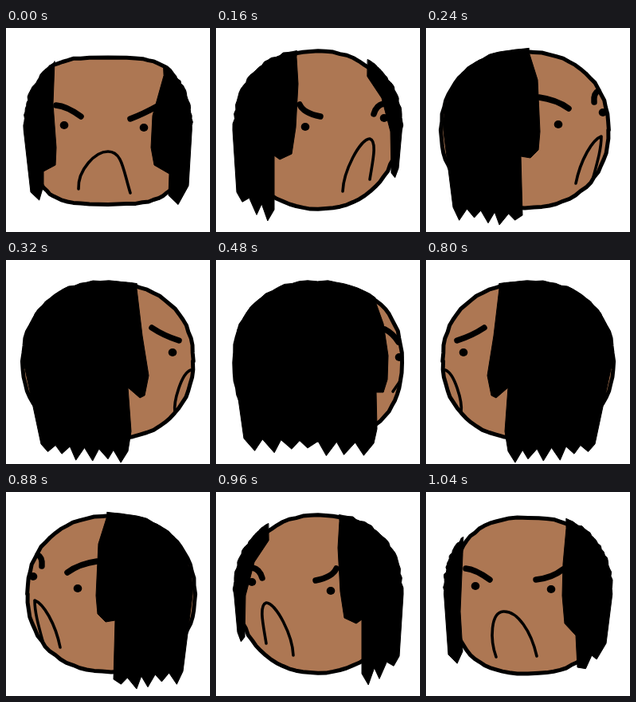
Animation, 256 px wide and 256 px high, one loop 1.12 s. Source, as an HTML page:

```html
<!DOCTYPE html>
<html lang="en">
<head>
<meta charset="utf-8">
<title>Turning head</title>
<style>
  html, body { margin: 0; width: 100%; height: 100%; overflow: hidden; background: #fff; }
  svg { display: block; width: 100%; height: 100%; }
  g { stroke: #000; stroke-linejoin: round; stroke-linecap: round; }
  .skin { fill: #ad7753; stroke-width: 5; }
  .hair { stroke-width: 1; }
  .line { fill: none; stroke-width: 3.6; }
  .brow { fill: none; stroke-width: 7.5; }
  .eye { stroke: none; }
</style>
</head>
<body>
<svg id="stage" viewBox="0 0 256 256"></svg>
<script>
const STEP = 80;
const MANE = { x: 128, y: 128, rx: 106, ry: 102, n: 2.3 };

// Poses from facing front to facing away, all turning right.
// skull: centre y, radii and squareness. near / far: the inner edge of the hair
// from top to bottom, its outer hem corner and how many tufts hang between.
// The far side is written mirrored.
const poses = [
  {
    skull: { y: 129, rx: 94, ry: 92, n: 3.5 },
    near: { edge: 'M61 42L59 95L63 150L62 172L47 180L47 198', hem: [31, 206], tufts: 1 },
    far: { edge: 'M58 60L72 110L74 150L70 172L51 183L52 210', hem: [27, 198], tufts: 1 },
    brows: 'M63 97Q76 98 94 111M156 114Q172 108 190 98',
    eyes: [[73, 122], [173, 125]],
    mouth: 'M91 202C90 178 112 155 128 155C146 155 147 178 156 207'
  },
  {
    skull: { y: 130, rx: 95, ry: 98, n: 2.5 },
    near: { edge: 'M80 46L84 90L85 130L82 165L68 180L66 220', hem: [30, 190], tufts: 2 },
    far: { edge: 'M46 78L43 150L46 200', hem: [28, 204], tufts: 1 },
    brows: 'M84 97Q98 108 118 110M206 96Q194 97 176 110',
    eyes: [[99, 122], [194, 118]],
    mouth: 'M168 207C176 185 175 151 159 150C141 149 124 175 117 206'
  },
  {
    skull: { y: 128, rx: 100, ry: 99, n: 2.1 },
    near: { edge: 'M101 37L103 70L100 125L95 158L80 165L73 160L73 228', hem: [26, 206], tufts: 3 },
    far: { edge: 'M66 61L48 88L37 130L36 182', hem: [27, 176], tufts: 1 },
    brows: 'M105 96Q110 107 131 111M198 108Q201 97 210 95',
    eyes: [[112, 124], [211, 113]],
    mouth: 'M159 205C160 180 180 140 193 139C203 142 196 170 193 190'
  },
  {
    skull: { x: 124, y: 128, rx: 105, ry: 98, n: 2.2 },
    near: { edge: 'M129 30L140 65L143 130L141 153L131 163L119 161L121 235', hem: [34, 225], tufts: 5 },
    brows: 'M179 101Q164 90 142 87M216 79Q210 82 211 93',
    eyes: [[166, 121], [222, 106]],
    mouth: 'M210 187C216 165 220 150 220 136C209 140 194 165 188 195L210 187'.replace('L210 187', '')
  },
  {
    skull: { y: 127, rx: 107, ry: 98, n: 2.2 },
    near: { edge: 'M164 36L171 95L179 145L174 170L168 173L153 160L157 215L153 240', hem: [44, 231], tufts: 6 },
    brows: 'M183 85Q198 95 217 101',
    eyes: [[209, 116]],
    mouth: 'M212 191C210 178 220 142 232 138'
  },
  {
    skull: { y: 128, rx: 106, ry: 98, n: 2.3 },
    near: { edge: 'M182 42L194 95L199 140L194 170L179 164L180 215L177 232', hem: [39, 228], tufts: 7 },
    brows: 'M204 87Q216 94 229 100',
    eyes: [[226, 117]],
    mouth: 'M218 184C215 173 222 160 232 152'
  },
  {
    skull: { y: 129, rx: 105, ry: 97, n: 2.4 },
    near: { edge: 'M200 52L210 80L216 120L215 150L210 166L201 166L202 212L198 230', hem: [35, 224], tufts: 7 },
    brows: 'M212 87Q222 92 229 103',
    eyes: [[230, 122]],
    mouth: 'M222 165L231 152'
  },
  {
    near: { edge: 'M234 128L220 224', hem: [36, 224], tufts: 8 }
  }
];

function seeded(seed) {
  return () => (seed = seed * 16807 % 2147483647) / 2147483647;
}
const random = seeded(4211);

const path = (kind, d) => `<path class="${kind}" d="${d}"/>`;
const mirror = art => `<g transform="translate(256 0) scale(-1 1)">${art}</g>`;

// Points of a slightly shaky superellipse, anticlockwise on screen.
function arc({ x = 128, y, rx, ry, n }, from, to, steps, shake) {
  const bend = v => Math.sign(v) * Math.abs(v) ** (2 / n);
  return Array.from({ length: steps + 1 }, (_, i) => {
    const a = from + (to - from) * i / steps;
    const r = 1 + (random() - 0.5) * shake;
    return [x + rx * r * bend(Math.cos(a)), y - ry * r * bend(Math.sin(a))];
  });
}

const join = points => points.map(p => p.map(v => v.toFixed(1)).join(' ')).join('L');

function skull(shape) {
  return path('skin', `M${join(arc(shape, 0, Math.PI * 2, 72, 0.012))}Z`);
}

// Down the inner edge, along the ragged hem, then up and over the crown.
function hair({ edge, hem, tufts }) {
  const inner = edge.slice(1).split('L').map(p => p.split(' ').map(Number));
  const [topX] = inner[0];
  const [endX, endY] = inner.at(-1);
  const along = t => [endX + (hem[0] - endX) * t, endY + (hem[1] - endY) * t];

  const fringe = [];
  for (let i = 0; i < tufts; i++) {
    const [x, y] = along((i + 0.3 + random() * 0.4) / tufts);
    fringe.push([x, y + 7 + random() * 11], along((i + 1) / tufts));
  }

  const dx = (topX - MANE.x) / MANE.rx;
  const start = Math.acos(Math.sign(dx) * Math.abs(dx) ** (MANE.n / 2));
  const crown = arc(MANE, start, Math.PI, 26, 0.02).reverse();
  return path('hair', `${edge}L${join([...fringe, ...crown])}Z`);
}

function draw(pose) {
  const parts = [];
  if (pose.skull) parts.push(skull(pose.skull));
  parts.push(hair(pose.near));
  if (pose.far) parts.push(mirror(hair(pose.far)));
  if (pose.mouth) {
    parts.push(path('brow', pose.brows), path('line', pose.mouth));
    for (const [x, y] of pose.eyes) {
      parts.push(`<ellipse class="eye" cx="${x}" cy="${y}" rx="5.3" ry="4.9"/>`);
    }
  }
  return parts.join('');
}

// Turn right to the back, then the mirrored way home.
const rightward = poses.map(draw);
const leftward = rightward.slice(1, -1).reverse().map(mirror);

const stage = document.getElementById('stage');
const frames = [...rightward, ...leftward].map(art => {
  const g = document.createElementNS('http://www.w3.org/2000/svg', 'g');
  g.innerHTML = art;
  return stage.appendChild(g);
});

function tick() {
  const now = Math.floor(performance.now() / STEP) % frames.length;
  frames.forEach((g, i) => g.setAttribute('display', i === now ? 'inline' : 'none'));
  requestAnimationFrame(tick);
}
tick();
</script>
</body>
</html>
```
